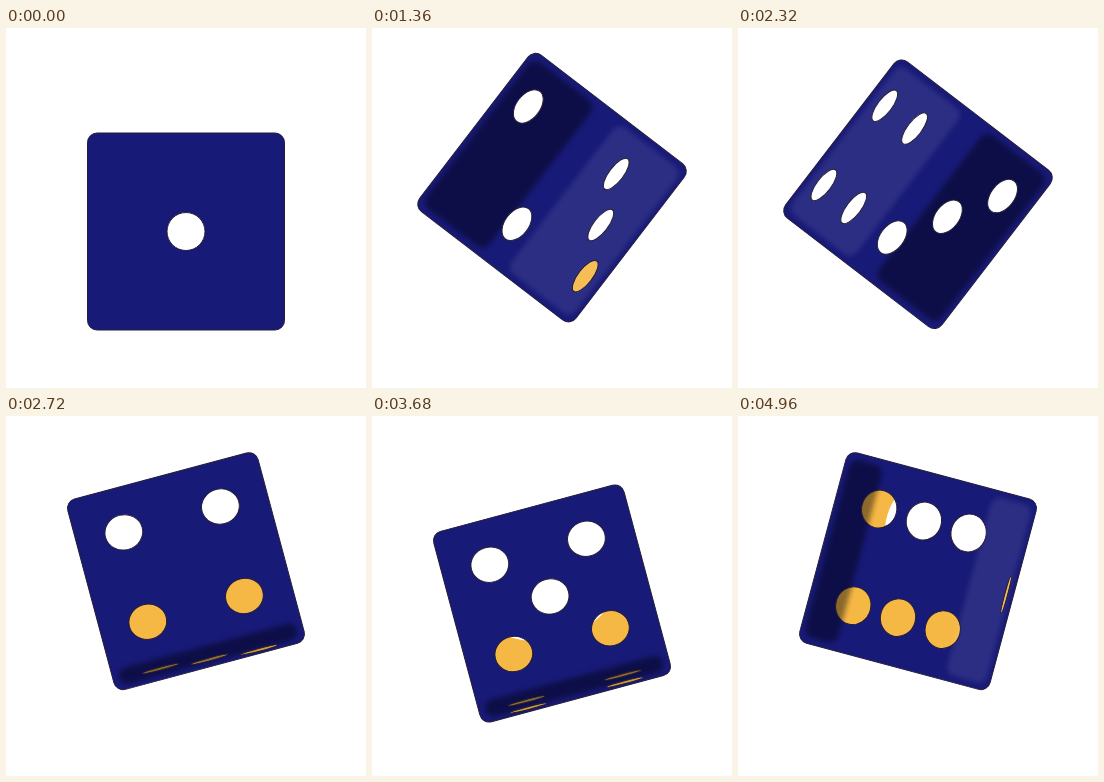
An HTML page with a canvas for the animation above (5000 ms loop, 360 by 360 pixels).

```html
<!DOCTYPE html>
<html lang="en">
<head>
<meta charset="utf-8">
<title>Rolling die</title>
<style>
  html, body { margin: 0; width: 100%; height: 100%; overflow: hidden; background: #fff; }
  canvas { display: block; width: 360px; height: 360px; }
</style>
</head>
<body>
<canvas id="stage" width="360" height="360"></canvas>
<script>
const ctx = document.getElementById('stage').getContext('2d');
const LOOP = 5000, STEP = 40, ROLL = 960;
const HALF = 98.5, PIP = 19, GAP = 50;
const BODY = '#181a78', LINE = '#231d3a', GOLD = '#f6b845';

// Pips of each face as it lies at rest, in units of GAP.
const CORNERS = [[-1, -1], [1, -1], [-1, 1], [1, 1]];
const FACES = [
  [[0, 0]],
  [[-1, -1], [1, 1]],
  [[1, -1], [0, 0], [-1, 1]],
  CORNERS,
  [...CORNERS, [0, 0]],
  [...CORNERS, [0, -1], [0, 1]]
];
// Side from which the next face comes in, per roll.
const SIDES = [1, 1, -1, -1, 1, 1];

// Shading widths over one roll: progress, dark, light, light strength.
const SHADE = [
  [0, 0, 0, 1], [1 / 6, 34, 41, 1], [0.5, 94, 94, 1],
  [5 / 6, 17, 94, 0], [1, 0, 94, 0]
];
// White light seen through the holes: time, offset x, offset y, radius.
const GLOW = [
  [0, 0, 0, 150], [800, -55, -20, 60], [1920, 0, 0, 150],
  [2720, -14, -51, 77], [3680, -14, -51, 89],
  [4320, 15, 0, 106], [4960, 25, -40, 58]
];

const smooth = u => u * u * (3 - 2 * u);

function sample(table, at) {
  let i = 1;
  while (i < table.length - 1 && at > table[i][0]) i++;
  const a = table[i - 1], b = table[i];
  const k = Math.min(1, (at - a[0]) / (b[0] - a[0]));
  return a.slice(1).map((v, j) => v + (b[j + 1] - v) * k);
}

// Cubic Bezier easing (x1, 0, x2, 1).
function bezier(x, x1, x2) {
  let lo = 0, hi = 1;
  for (let i = 0; i < 24; i++) {
    const s = (lo + hi) / 2, r = 1 - s;
    if (3 * r * r * s * x1 + 3 * r * s * s * x2 + s * s * s < x) lo = s;
    else hi = s;
  }
  return smooth(lo);
}

function centerY(t) {
  const x = Math.abs(t % (2 * ROLL) - ROLL) / ROLL;
  return 154.5 + 49 * bezier(x, 0.85, 0.84);
}

function addPips(path, pips, mid, scale) {
  if (scale < 0.004) return;
  for (const [px, py] of pips) {
    const x = mid + px * GAP * scale, y = py * GAP;
    path.moveTo(x + PIP * scale, y);
    path.ellipse(x, y, PIP * scale, PIP, 0, 0, 2 * Math.PI);
  }
}

function shade(side, width, color) {
  if (width < 1) return;
  ctx.fillStyle = color;
  ctx.beginPath();
  ctx.roundRect(side < 0 ? -94 : 94 - width, -92, width, 184, Math.min(9, width / 2));
  ctx.fill();
}

function draw(t) {
  const n = Math.floor(t / ROLL), p = t % ROLL / ROLL;
  const side = SIDES[n], turn = p * Math.PI / 2, s = smooth(p);
  const [dark, light, power] = sample(SHADE, p);
  const [gx, gy, radius] = sample(GLOW, t);
  const cy = centerY(t);

  ctx.setTransform(1, 0, 0, 1, 0, 0);
  ctx.fillStyle = '#fff';
  ctx.fillRect(0, 0, 360, 360);
  ctx.save();
  ctx.translate(180, cy);
  ctx.rotate(turn);

  const body = new Path2D();
  body.roundRect(-HALF, -HALF, 2 * HALF, 2 * HALF, 9.5);
  ctx.fillStyle = BODY;
  ctx.fill(body);

  // The next face lands a quarter turn later, so its pips start turned back.
  const next = FACES[(n + 1) % 6].map(([x, y]) => [y, -x]);
  const holes = new Path2D();
  addPips(holes, FACES[n], -side * HALF * s, 1 - s);
  addPips(holes, next, side * HALF * (1 - s), s);
  ctx.fillStyle = GOLD;
  ctx.fill(holes);

  ctx.save();
  ctx.clip(body);
  ctx.filter = 'blur(2.5px)';
  shade(-side, dark, 'rgba(0,0,8,0.43)');
  shade(side, light, `rgba(255,255,255,${0.09 * power})`);
  ctx.restore();

  ctx.save();
  ctx.clip(holes);
  ctx.rotate(-turn);
  ctx.fillStyle = '#fff';
  ctx.beginPath();
  ctx.arc(gx, gy, radius, 0, 2 * Math.PI);
  ctx.fill();
  ctx.restore();

  ctx.strokeStyle = LINE;
  ctx.lineWidth = 1;
  ctx.stroke(holes);
  ctx.stroke(body);
  ctx.restore();
}

const start = performance.now();
function tick() {
  const t = (performance.now() - start) % LOOP;
  draw(Math.floor(t / STEP) * STEP);
  requestAnimationFrame(tick);
}
tick();
</script>
</body>
</html>
```
